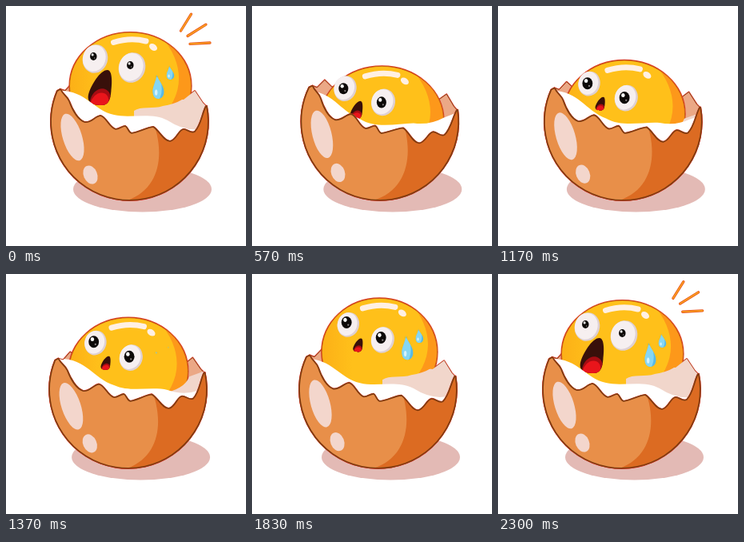
An HTML page with a canvas that plays this animation: 300 by 300 pixels, repeating every 2.33 s.

```html
<!DOCTYPE html>
<html lang="en">
<head>
<meta charset="utf-8">
<title>Scared egg</title>
<style>
  html, body { margin: 0; width: 100%; height: 100%; overflow: hidden; background: #fff; }
  canvas { display: block; width: 300px; height: 300px; }
</style>
</head>
<body>
<canvas id="stage"></canvas>
<script>
const LOOP = 2330, STEP = 100 / 3;
const canvas = document.getElementById('stage');
const ctx = canvas.getContext('2d');
const dpr = Math.max(1, window.devicePixelRatio || 1);
canvas.width = canvas.height = 300 * dpr;

// Smooth 0 to 1 between times a and b.
function ease(t, a, b) {
  const u = Math.min(1, Math.max(0, (t - a) / (b - a)));
  return (1 - Math.cos(Math.PI * u)) / 2;
}
// Fades out between a and b, comes back between c and d.
const away = (t, a, b, c, d) => 1 - ease(t, a, b) + ease(t, c, d);

function fill(path, color) { ctx.fillStyle = color; ctx.fill(path); }
function line(path, color, width) {
  ctx.strokeStyle = color;
  ctx.lineWidth = width;
  ctx.stroke(path);
}
function ellipse(x, y, rx, ry, color, turn = 0) {
  const p = new Path2D();
  p.ellipse(x, y, rx, ry, turn, 0, Math.PI * 2);
  if (color) fill(p, color);
  return p;
}
function scoped(draw) { ctx.save(); draw(); ctx.restore(); }
function resetView() { ctx.setTransform(dpr, 0, 0, dpr, 0, 0); }

// A rim from the left tip to the right one, closed by the round bottom.
function bowl(rim) {
  const p = new Path2D(rim);
  p.arc(154.5, 144.5, 98.3, -0.2, Math.PI + 0.4);
  p.closePath();
  return p;
}
const shell = bowl('M68 104C72 112 76 112 79 119C83 130 90 142 98 145C106 147 111 138 118 137'
  + 'C125 138 129 152 137 154C142 154 145 150 149 150C152 151 153 158 157 159C166 158 175 152 184 151'
  + 'C192 156 197 169 205 169C213 168 216 154 222 154C227 154 231 160 236 157C244 149 245 134 250 125');
const inside = bowl('M68 104L74 106L83 96L92 104L222 117L236 106L246 121L250 125');
const shellDark = new Path2D('M182 140C199 180 196 232 145 245H270V110Z');
const membrane = new Path2D('M160 131C168 125 185 129 196 125C215 122 227 115 231 104L270 90V200H160Z');
const mouthShape = new Path2D('M-.5 .2C-.4 -.05 0 -.5 .32 -.5C.55 -.5 .52 -.1 .48 .1C.45 .35 .35 .5 .05 .5C-.25 .5 -.58 .45 -.5 .2Z');
const dropShape = new Path2D('M-.15 -.5C0 -.25 .5 -.05 .5 .2C.5 .38 .3 .5 0 .5C-.3 .5 -.5 .38 -.5 .2C-.5 -.05 -.2 -.2 -.15 -.5Z');

function pose(t) {
  const sink = ease(t, 0, 750) - ease(t, 750, 1960);
  const shock = away(t, 0, 800, 1880, 2080);
  const roll = 7 * ease(t, 150, 770) - 10 * ease(t, 800, 1520)
    + 6 * ease(t, 1560, 1840) - 3 * ease(t, 1860, 2200);
  return {
    sink, shock, roll,
    cx: 155.5 + roll * 1.3,
    top: 29 + 53 * sink + 4 * shock,
    rx: 72 + 4 * shock + 5 * sink,
    deep: sink * sink,
    panic: shock * shock
  };
}

function rollView(dx) {
  ctx.translate(154.5 + dx, 145);
  ctx.rotate(dx * 0.0096);
  ctx.translate(-154.5, -145);
}

function drawYolk({ rx }) {
  const body = ellipse(0, 67, rx, 67);
  line(body, '#e23a22', 2.2);
  const glow = ctx.createLinearGradient(-rx, 0, rx * 0.5, 0);
  glow.addColorStop(0, '#fcb017');
  glow.addColorStop(0.35, '#ffc01a');
  fill(body, glow);
  scoped(() => {
    ctx.clip(body);
    fill(new Path2D('M38 4C70 42 68 80 32 114L34 150H100V-10Z'), '#fd981a');
    ctx.lineCap = 'round';
    line(new Path2D('M-21 12.5Q0 6 19.5 11'), '#fff0e3', 7);
    ellipse(28.5, 18.5, 5.5, 3.8, '#fff0e3', 0.6);
  });
  line(body, '#a64a12', 0.6);
}

function drawEye(x, y, ry, { sink, shock }) {
  ellipse(x, y, ry * 0.87, ry, '#ded0d3', 0.3);
  ellipse(x - 1.2, y - 0.8, ry * 0.79, ry * 0.93, '#f6eff0', 0.3);
  const px = x - 2.2, py = y - 3 + 3.5 * sink, r = 7 - 2.4 * shock;
  ellipse(px, py, r * 0.92, r * 1.08, '#0d0908');
  ellipse(px - r * 0.25, py - r * 0.45, r * 0.32, r * 0.36, '#fff');
  ellipse(px + r * 0.3, py + r * 0.45, r * 0.16, r * 0.16, '#8b8586');
}

function drawFace(p) {
  const { shock, deep, panic } = p, ry = 16 + 2.5 * shock;
  drawEye(-39 - 5 * panic - 9 * deep, 33 - 7 * deep, ry * 0.97, p);
  drawEye(4 - 2 * panic - 3 * deep, 52 - 8 * panic - 9 * deep, ry * 1.03, p);
  scoped(() => {
    ctx.translate(-27 - 11 * panic - 6 * deep, 58.5 + 10.5 * shock - 8 * deep);
    ctx.scale(12 + 17 * shock, 17 + 27 * shock);
    fill(mouthShape, '#38100a');
    ctx.clip(mouthShape);
    ellipse(0.02, 0.38, 0.46, 0.34, '#a60c12', -0.3);
    ellipse(-0.02, 0.43, 0.4, 0.27, '#e9151b', -0.3);
  });
}

function drawDrop(x, y, w, h) {
  scoped(() => {
    ctx.translate(x, y);
    ctx.scale(w, h);
    fill(dropShape, '#58b9e4');
    ctx.clip(dropShape);
    ellipse(-0.12, 0.08, 0.42, 0.48, '#86d6f3');
    ellipse(-0.2, 0.24, 0.12, 0.12, '#d4f2fc');
  });
}

function drawSweat(t, { sink, shock }) {
  const size = away(t, 130, 270, 1340, 1480);
  const y = 63 + 5 * shock - 40 * sink;
  if (size < 0.01) return;
  drawDrop(35, y, 14 * size, 30 * size);
  drawDrop(50, y * 0.55 + 13, 9.5 * size, 17 * size);
}

function drawWhite({ sink: s, roll }) {
  scoped(() => {
    rollView(roll);
    ctx.clip(inside);
    resetView();
    scoped(() => {
      ctx.translate(roll, 50 * s);
      fill(membrane, '#f1d6cb');
    });
    fill(new Path2D(`M50 200L64 106C100 104 108 130 135 ${136 + 6 * s}`
      + `C155 ${141 + 15 * s} 182 ${132 + 17 * s} 202 ${143 + 4 * s}`
      + `Q222 ${156 - 8 * s} 240 ${154 - 17 * s}L264 ${151 - 24 * s}V200Z`), '#fff');
  });
}

function drawBack() {
  line(inside, '#e23a2c', 2);
  fill(inside, '#eba886');
  line(inside, '#8a4417', 0.9);
}

function drawShell() {
  line(shell, '#e23a2c', 2.2);
  fill(shell, '#e88f49');
  scoped(() => {
    ctx.clip(shell);
    fill(shellDark, '#dc6b22');
  });
  ellipse(83, 164, 12, 30.5, '#f3d6cc', -0.3);
  ellipse(105.5, 211, 8.5, 12, '#f3d6cc', -0.4);
  line(shell, '#7d3d10', 1.6);
}

function drawSparks(t) {
  const show = away(t, 130, 230, 1990, 2090);
  if (show < 0.01) return;
  const out = 2.3 * (1 - Math.cos(t / LOOP * Math.PI * 20));
  ctx.lineCap = 'round';
  for (const [x, y, length, angle] of [[218.5, 31, 24.5, -58], [227, 37.5, 27, -32], [230, 47.3, 25, -3]]) {
    scoped(() => {
      ctx.translate(x, y);
      ctx.rotate(angle * Math.PI / 180);
      const ray = new Path2D(`M${out} 0H${out + length * show}`);
      line(ray, '#e8521c', 3.3);
      line(ray, '#f9a21f', 1.7);
    });
  }
}

function draw(t) {
  const p = pose(t);
  const rolled = part => scoped(() => { rollView(p.roll); part(); });
  resetView();
  ctx.fillStyle = '#fff';
  ctx.fillRect(0, 0, 300, 300);
  ctx.lineJoin = 'round';

  ellipse(170.5 + p.roll, 229, 86.5, 28.5, '#e3bab5');
  rolled(drawBack);
  scoped(() => {
    ctx.translate(p.cx, p.top);
    drawYolk(p);
    drawFace(p);
    drawSweat(t, p);
  });
  drawWhite(p);
  rolled(drawShell);
  drawSparks(t);
}

const start = performance.now();
function tick() {
  const t = (performance.now() - start) % LOOP;
  draw(Math.floor((t + 3.4) / STEP) * STEP % LOOP);
  requestAnimationFrame(tick);
}
tick();
</script>
</body>
</html>
```
